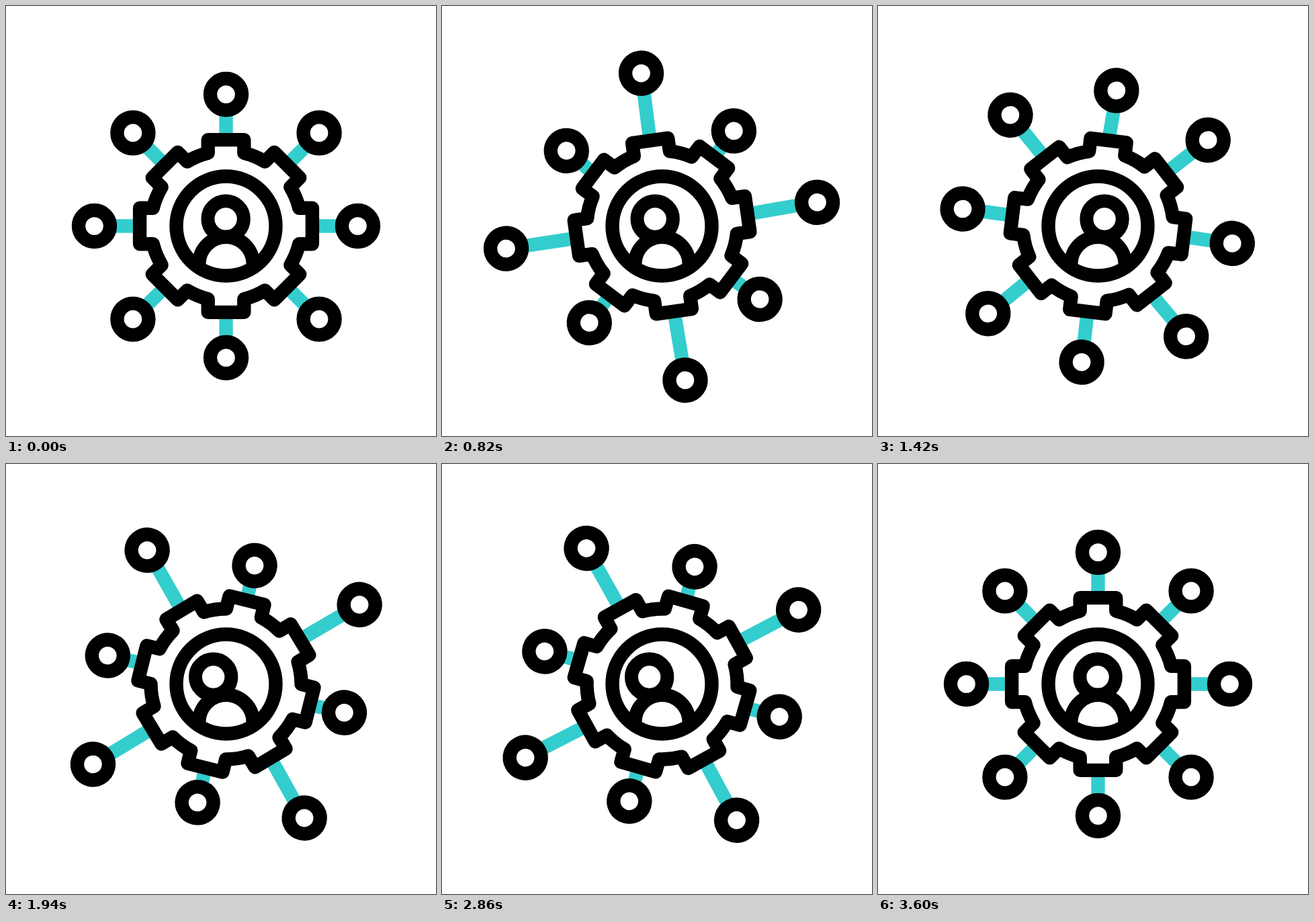
Write an HTML page with a canvas that moves like this. It is 640 px wide and 640 px high and loops after 3620 ms.

```html
<!DOCTYPE html>
<html lang="en">
<head>
<meta charset="utf-8">
<title>Network gear</title>
<style>
  html, body { margin: 0; width: 100%; height: 100%; overflow: hidden; background: #fff; }
  canvas { display: block; width: 640px; height: 640px; }
</style>
</head>
<body>
<canvas id="stage" width="640" height="640"></canvas>
<script>
const ctx = document.getElementById('stage').getContext('2d');

const LOOP = 3620, TICK = 20, TURN = 3600;
const CENTER = 327.5, STROKE = 20.4;
const INK = '#000', SPOKE = '#33cdcd';
const REST = [196, 0];

// Clockwise from the right, 45° apart: [distance, sideways shift] pulled in and pushed out.
const NODES = [
  { near: [177.9, -1.4], far: [232.4, -2.2] },
  { near: [179.7, -0.2], far: [234.5, 2.1] },
  { near: [177.9, -1.4], far: [234.8, -0.9] },
  { near: [180.7, 3.9], far: [234.4, 0.9] },
  { near: [177.9, -1.4], far: [229.9, 1] },
  { near: [177, 0.1], far: [234.5, 2.9] },
  { near: [177.9, -1.4], far: [234.1, -2.8] },
  { near: [181.5, -0.6], far: [234.5, -0.4] }
];

const smooth = p => p * p * (3 - 2 * p);
const mix = (a, b, p) => a + (b - a) * p;

// Locates t between evenly spaced keys and returns [key index, eased progress].
function locate(t, step) {
  const key = Math.floor(t / step);
  return [key, smooth(t / step - key)];
}

function nodePlace(i, t) {
  const [key, p] = locate(t, 400);
  const pose = k => {
    if (k <= 0 || k >= 9) return REST;
    return (k + i) % 2 ? NODES[i].near : NODES[i].far;
  };
  const from = pose(key), to = pose(key + 1);
  return [mix(from[0], to[0], p), mix(from[1], to[1], p)];
}

function headShift(t) {
  const [key, p] = locate(t, 600);
  const pose = k => k <= 0 || k >= 6 ? 0 : (k % 2 ? -25.5 : 25.5);
  return mix(pose(key), pose(key + 1), p);
}

function ring(x, y, r, width = STROKE) {
  ctx.beginPath();
  ctx.arc(x, y, r, 0, Math.PI * 2);
  ctx.lineWidth = width;
  ctx.stroke();
}

function drawNode(i, t) {
  const [dist, side] = nodePlace(i, t);
  ctx.save();
  ctx.rotate(i * Math.PI / 4);
  ctx.lineWidth = STROKE;
  ctx.strokeStyle = SPOKE;
  ctx.beginPath();
  ctx.moveTo(128, 0);
  ctx.lineTo(dist - 20, side);
  ctx.stroke();
  ctx.strokeStyle = INK;
  ring(dist, side, 23.5);
  ctx.restore();
}

function drawGear() {
  const root = 112, tip = 128.4, half = 26.8;
  const spread = Math.asin(half / root);
  ctx.beginPath();
  for (let i = 0; i < 8; i++) {
    const a = i * Math.PI / 4, c = Math.cos(a), s = Math.sin(a);
    for (const y of [-half, half]) ctx.lineTo(tip * c - y * s, tip * s + y * c);
    ctx.arc(0, 0, root, a + spread, a + Math.PI / 4 - spread);
  }
  ctx.closePath();
  ctx.lineWidth = STROKE;
  ctx.lineJoin = 'round';
  ctx.strokeStyle = INK;
  ctx.stroke();
}

function drawPerson(t) {
  ctx.strokeStyle = INK;
  ring(headShift(t) - 0.4, -10.5, 26.7, 20);
  ctx.beginPath();
  ctx.arc(0, 56.5, 40.2, Math.PI, 0);
  ctx.lineWidth = STROKE;
  ctx.stroke();
  ring(0, 0, 74);
}

function draw(t) {
  ctx.fillStyle = '#fff';
  ctx.fillRect(0, 0, 640, 640);
  ctx.save();
  ctx.translate(CENTER, CENTER);
  ctx.save();
  ctx.rotate(t / TURN * Math.PI * 2);
  NODES.forEach((_, i) => drawNode(i, t));
  drawGear();
  ctx.restore();
  drawPerson(t);
  ctx.restore();
}

const start = performance.now();
function frame() {
  const t = (performance.now() - start) % LOOP;
  draw(Math.floor(t / TICK) * TICK);
  requestAnimationFrame(frame);
}
frame();
</script>
</body>
</html>
```
